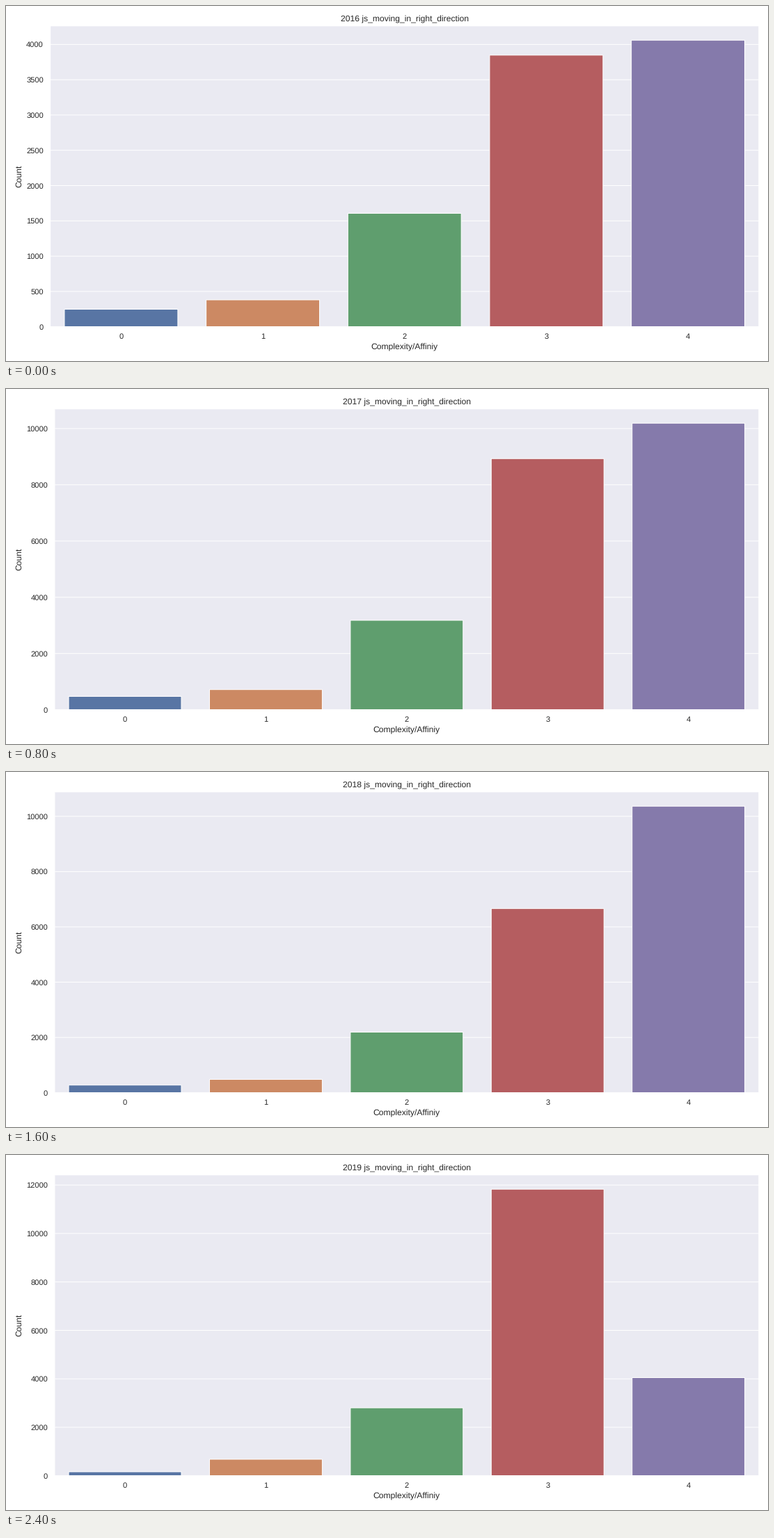
Recreate the animation shown at these times as a matplotlib script. Size 1095 px wide and 511 px high, loop 3.2 s.

```python
import matplotlib.pyplot as plt
from matplotlib.animation import FuncAnimation

W, H, DPI = 1095, 511, 73
RIGHT, TOP, BOTTOM = 1081.9, 28.6, 461.7
DIGIT = 6.2  # width of one tick label digit in pixels
INK = "#262626"
COLORS = ["#5875a4", "#cc8963", "#5f9e6e", "#b55d60", "#857aab"]

COUNTS = {
    2016: [248, 381, 1607, 3848, 4060],
    2017: [474, 717, 3180, 8930, 10190],
    2018: [277, 483, 2193, 6662, 10366],
    2019: [163, 680, 2802, 11827, 4050],
}

# Unsnapped paths and unhinted text keep fractional pixel positions.
plt.rcParams.update({
    "font.family": "Liberation Sans",
    "font.size": 12,
    "text.hinting": "no_hinting",
    "path.snap": False,
    "axes.titlesize": 12,
    "axes.facecolor": "#eaeaf2",
    "axes.edgecolor": "white",
    "axes.linewidth": 1.25,
    "axes.axisbelow": True,
    "axes.labelcolor": INK,
    "text.color": INK,
    "grid.color": "white",
    "grid.linewidth": 1,
})

fig = plt.figure(figsize=(W / DPI, H / DPI), dpi=DPI, facecolor="white")


def draw(i):
    year = 2016 + i
    counts = COUNTS[year]
    left = 38.8 + DIGIT * len(str(max(counts)))

    fig.clear()
    ax = fig.add_axes([left / W, 1 - BOTTOM / H,
                       (RIGHT - left) / W, (BOTTOM - TOP) / H])
    ax.bar(range(5), counts, width=0.8, color=COLORS,
           edgecolor="white", linewidth=1)
    ax.set_xlim(-0.5, 4.5)
    ax.set_ylim(0, max(counts) * 1.05)
    ax.grid(axis="y")
    ax.tick_params(left=False, bottom=False, length=6, pad=3.5,
                   labelsize=11, labelcolor=INK)
    ax.set_title(f"{year} js_moving_in_right_direction")
    ax.set_xlabel("Complexity/Affiniy")
    ax.set_ylabel("Count")
    return [ax]


anim = FuncAnimation(fig, draw, frames=len(COUNTS), interval=800,
                     repeat=True, repeat_delay=0)
plt.show()
```
